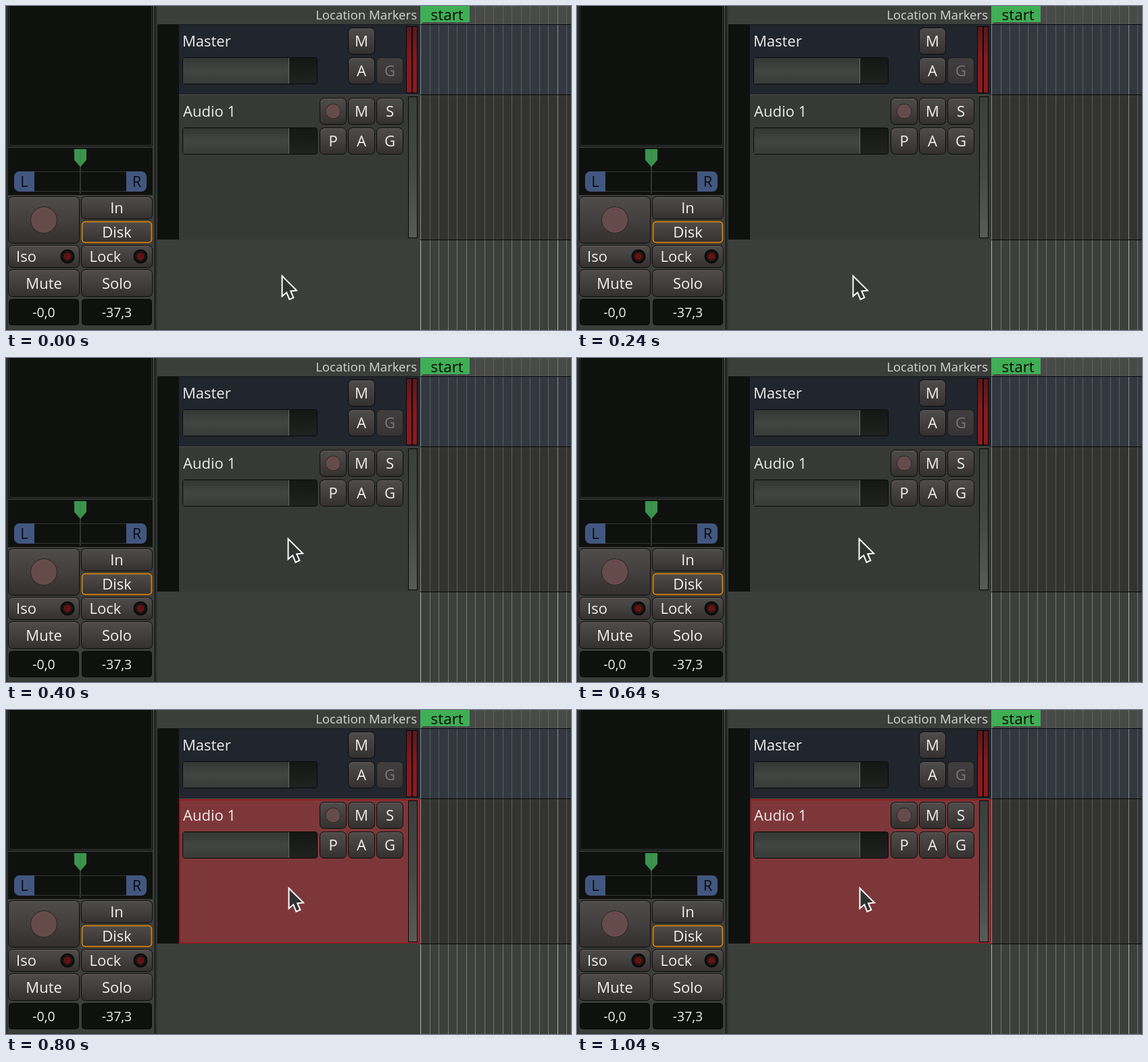
An HTML page with a canvas that plays this animation: 836 px wide and 480 px high, repeating every 1.2 s.

```html
<!DOCTYPE html>
<html lang="en">
<head>
<meta charset="utf-8">
<title>Track selection</title>
<style>
html, body { margin: 0; width: 100%; height: 100%; overflow: hidden; background: #3c3e3b; }
canvas { display: block; width: 836px; height: 480px; }
</style>
</head>
<body>
<canvas id="stage" width="836" height="480"></canvas>
<script>
const ctx = document.getElementById('stage').getContext('2d');
const FONT = '"Open Sans", "Noto Sans", sans-serif';
const DARK = '#0f110e';
const LOOP = 1200;
const POSES = [
  { x: 407, y: 397, selected: false },
  { x: 416, y: 265, selected: false },
  { x: 417, y: 261, selected: true }
];

function rect(x, y, w, h, fill) {
  ctx.fillStyle = fill;
  ctx.fillRect(x, y, w, h);
}

function shade(y, h, ...colors) {
  const g = ctx.createLinearGradient(0, y, 0, y + h);
  colors.forEach((c, i) => g.addColorStop(i / (colors.length - 1), c));
  return g;
}

function round(x, y, w, h, r, fill, stroke, line = 1) {
  ctx.beginPath();
  ctx.roundRect(x, y, w, h, r);
  ctx.fillStyle = fill;
  ctx.fill();
  if (stroke) {
    ctx.strokeStyle = stroke;
    ctx.lineWidth = line;
    ctx.stroke();
  }
}

function disc(x, y, r, fill, stroke) {
  ctx.beginPath();
  ctx.arc(x, y, r, 0, Math.PI * 2);
  ctx.fillStyle = fill;
  ctx.fill();
  if (stroke) {
    ctx.strokeStyle = stroke;
    ctx.lineWidth = 1;
    ctx.stroke();
  }
}

function text(s, x, y, size = 22, align = 'left', color = '#eeeeec') {
  ctx.font = `${size}px ${FONT}`;
  ctx.textAlign = align;
  ctx.fillStyle = color;
  ctx.fillText(s, x, y);
}

function button(x, y, w, h, label, off) {
  const fill = off ? shade(y, h, '#403e3e', '#353333') : shade(y, h, '#514c4c', '#433f3f', '#342f2f');
  round(x + .5, y + .5, w - 1, h - 1, 6, fill, off ? '#191a19' : '#0b0c0b');
  if (!off) rect(x + 6, y + 1, w - 12, 1, 'rgba(255,255,255,.1)');
  if (label) text(label, x + w / 2, y + h / 2 + 8, 22, 'center', off ? '#7a7877' : '#f2f2f0');
}

function led(x, y) {
  disc(x, y, 10.5, '#080908');
  disc(x, y, 8.5, '#191314');
  disc(x, y, 5.5, '#641214');
}

function fader(y) {
  round(261.5, y + .5, 199, 39, 3, shade(y, 40, '#151715', '#20221f'), '#090a09');
  rect(262, y + 1, 156, 38, shade(y, 40, '#333532', '#434542', '#393b38'));
  rect(418, y + 1, 1, 38, '#686a67');
}

function pan() {
  rect(3, 210, 214, 70, DARK);
  rect(42, 245, 136, 1, '#343633');
  rect(42, 274, 136, 1, '#343633');
  rect(109, 212, 2, 66, '#333532');
  round(12, 245, 30, 30, [8, 0, 0, 8], '#425780');
  round(178, 245, 30, 30, [0, 8, 8, 0], '#425780');
  text('L', 27, 268, 22, 'center', '#0b0d10');
  text('R', 193.5, 268, 22, 'center', '#0b0d10');
  ctx.beginPath();
  [[101, 212], [119, 212], [119, 228], [110, 238.5], [101, 228]].forEach(p => ctx.lineTo(...p));
  ctx.closePath();
  ctx.fillStyle = '#3b9450';
  ctx.fill();
  rect(109.5, 213, 1, 24, '#338245');
}

function strip() {
  rect(0, 0, 3, 480, '#30322f');
  rect(3, 0, 214, 209, '#050605');
  rect(4, 0, 212, 207, '#3a3c39');
  rect(5, 0, 210, 206, DARK);
  rect(3, 208, 214, 2, '#353734');
  pan();
  rect(217, 0, 2, 480, '#3f413e');
  rect(219, 0, 3, 480, '#232522');
  rect(222, 0, 2, 480, '#343633');

  button(3, 282, 106, 70);
  disc(56, 317, 19.5, '#654c4b', '#292423');
  button(111, 282, 106, 34, 'In');
  button(111, 318, 106, 34, 'Disk');
  ctx.beginPath();
  ctx.roundRect(112.5, 319.5, 103, 31, 5);
  ctx.strokeStyle = '#d28410';
  ctx.lineWidth = 2;
  ctx.stroke();
  button(3, 354, 106, 34);
  button(111, 354, 106, 34);
  text('Iso', 15, 379);
  text('Lock', 123.5, 379);
  led(91, 371);
  led(199, 371);
  button(3, 390, 106, 41, 'Mute');
  button(111, 390, 106, 41, 'Solo');
  [['-0,0', 4], ['-37,3', 112]].forEach(([s, x]) => {
    round(x + .5, 434.5, 103, 38, 4, DARK, '#080908');
    text(s, x + 52, 461, 19.5, 'center');
  });
}

function masterTrack() {
  rect(256, 27, 357, 104, '#21252d');
  rect(256, 27, 357, 1, '#181b20');
  rect(256, 131, 357, 1, '#4a4c49');
  text('Master', 261, 60);
  fader(76);
  button(506, 32, 40, 40, 'M');
  button(506, 76, 40, 40, 'A');
  button(548, 76, 40, 40, 'G', true);
  rect(592, 30, 17, 99, '#080908');
  rect(593, 31, 7, 97, shade(31, 97, '#5d171a', '#861a1e', '#8d1b1e'));
  rect(602, 31, 6, 97, shade(31, 97, '#5d171a', '#861a1e', '#8d1b1e'));
}

function audioTrack(selected) {
  rect(256, 132, 357, 214, selected ? '#7e3739' : '#373936');
  if (selected) {
    ctx.strokeStyle = '#901d21';
    ctx.lineWidth = 2;
    ctx.strokeRect(257, 133, 355, 212);
  }
  text('Audio 1', 262, 164);
  fader(180);
  button(464, 136, 40, 40);
  disc(484, 156, 11, '#654c4b', '#292423');
  button(506, 136, 40, 40, 'M');
  button(548, 136, 40, 40, 'S');
  ['P', 'A', 'G'].forEach((s, i) => button(464 + i * 42, 180, 40, 40, s));
  rect(595, 134, 14, 210, '#090a09');
  rect(596, 135, 12, 208, shade(135, 208, '#3c3e3c', '#454745', '#585a58'));
}

function timeline() {
  rect(613, 0, 223, 27, '#484a47');
  rect(613, 27, 223, 104, '#333840');
  rect(613, 132, 223, 214, '#333431');
  rect(613, 347, 223, 133, '#3d3f3c');
  for (let i = 0; i < 17; i++) {
    const x = Math.round(613 + i * 13.53);
    const strong = i % 15 === 0;
    rect(x, 0, 1, 27, strong ? '#777976' : '#5d5f5c');
    rect(x, 27, 1, 104, strong ? '#8b8e91' : '#595e64');
    rect(x, 132, 1, 214, strong ? '#898a88' : '#5a5b58');
    rect(x, 347, 1, 133, strong ? '#b4b5b3' : '#777976');
  }
  [27, 131, 346].forEach(y => rect(613, y, 223, 1, '#070807'));
  rect(613, 0, 73, 24, '#40ae55');
  ctx.beginPath();
  [[613, 24], [617, 24], [613, 28]].forEach(p => ctx.lineTo(...p));
  ctx.fill();
  text('start', 628.5, 20.5, 22.5, 'left', '#080a08');
}

function cursor(x, y) {
  ctx.save();
  ctx.translate(x, y);
  ctx.beginPath();
  [[1.5, 3], [1.5, 33], [8.2, 27.3], [12.4, 37.6], [18.4, 35], [14.2, 25.3], [23, 24.4]]
    .forEach(p => ctx.lineTo(...p));
  ctx.closePath();
  ctx.fillStyle = '#303331';
  ctx.fill();
  ctx.strokeStyle = '#ffffff';
  ctx.lineWidth = 2;
  ctx.stroke();
  ctx.restore();
}

function draw(pose) {
  rect(0, 0, 836, 480, '#3c3e3b');
  strip();
  text('Location Markers', 608, 19.5, 18.6, 'right', '#d5d6d3');
  rect(224, 27, 32, 319, DARK);
  masterTrack();
  audioTrack(pose.selected);
  timeline();
  rect(0, 479, 613, 1, '#302d2c');
  cursor(pose.x, pose.y);
}

const start = performance.now();
function tick() {
  const t = (performance.now() - start) % LOOP;
  draw(POSES[Math.floor(t / 400)]);
  requestAnimationFrame(tick);
}
tick();
</script>
</body>
</html>
```
